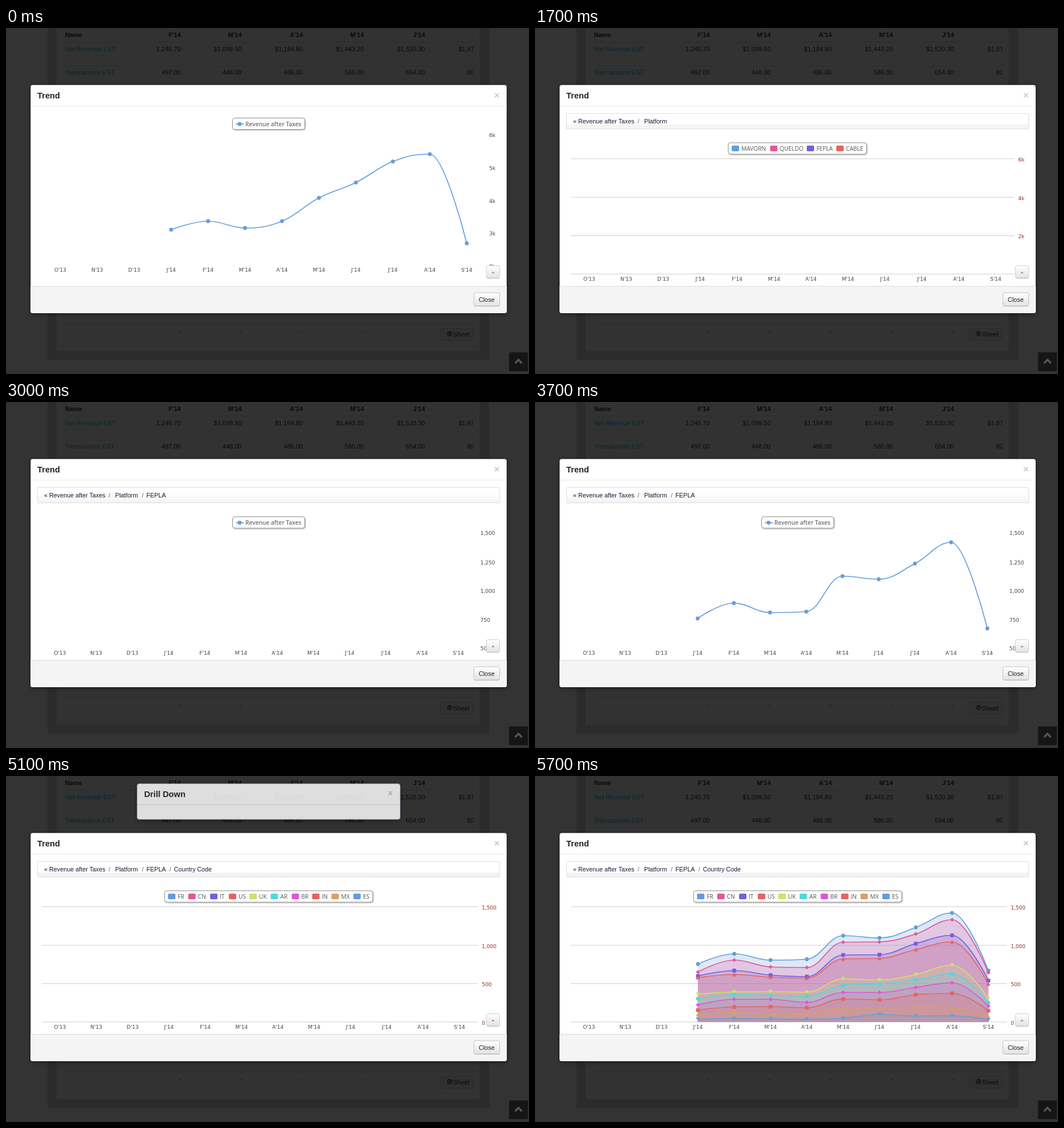
Animation, 920 px wide and 609 px high, one loop 7 s. Source, as an HTML page:

```html
<!DOCTYPE html>
<html lang="en">
<head>
<meta charset="utf-8">
<title>Trend</title>
<style>
html, body { margin: 0; width: 100%; height: 100%; overflow: hidden; background: #333; }
svg { display: block; width: 920px; height: 609px; }
text { font-family: "Liberation Sans", Arial, sans-serif; font-size: 11px; white-space: pre; }
.title { font-size: 14.7px; font-weight: bold; fill: #22252d; }
.x { font-size: 16px; font-weight: bold; fill: #c8c8c8; text-anchor: middle; }
.axis { font-family: "DejaVu Sans", sans-serif; font-size: 9px; fill: #444; }
.legend { font-family: "Open Sans", sans-serif; font-size: 10.2px; fill: #555; }
.tip { font-family: "Open Sans", sans-serif; font-size: 10.8px; fill: #333; }
.crumb { font-size: 10.8px; fill: #17173a; }
.pick { font-size: 9.5px; fill: #fff; stroke: #fff; stroke-width: .3px; text-anchor: middle; }
.back { fill: #090909; }
.link { fill: #0b222d; }
</style>
</head>
<body>
<svg viewBox="0 0 920 609" xmlns="http://www.w3.org/2000/svg">
  <defs>
    <linearGradient id="btn" x2="0" y2="1"><stop stop-color="#fff"/><stop offset="1" stop-color="#e2e2e2"/></linearGradient>
    <linearGradient id="pick" x2="0" y2="1"><stop stop-color="#0a70d4"/><stop offset="1" stop-color="#0564c2"/></linearGradient>
    <linearGradient id="soft" x2="0" y2="1"><stop offset=".3" stop-color="#fff"/><stop offset="1" stop-color="#f3f3f3"/></linearGradient>
    <linearGradient id="band" x2="0" y2="1"><stop offset=".71" stop-color="#fff"/><stop offset=".71" stop-color="#f4f4f4"/></linearGradient>
    <filter id="drop" x="-10%" y="-20%" width="120%" height="150%"><feDropShadow dx="0" dy="2" stdDeviation="3" flood-opacity=".4"/></filter>
    <filter id="near" x="-10%" y="-20%" width="120%" height="150%"><feDropShadow dx="1" dy="1" stdDeviation=".8" flood-opacity=".35"/></filter>
    <clipPath id="cells"><rect x="264" y="0" width="558" height="100"/></clipPath>
    <clipPath id="wipe"><rect id="wipeBox" x="63" y="140" height="310"/></clipPath>
  </defs>
  <g id="page"></g>
  <g id="trend"></g>
  <g id="chart"></g>
  <g id="drill"></g>
</svg>
<script>
const LOOP = 7000, TICK = 100;
const BLUE = '#649ddb', PINK = '#e6559a', VIOLET = '#7a5bdc', RED = '#e8635f';
const MONTHS = "O'13 N'13 D'13 J'14 F'14 M'14 A'14 M'14 J'14 J'14 A'14 S'14".split(' ');
const METRIC = 'Revenue after Taxes';
const $ = id => document.getElementById(id);

const text = (x, y, s, cls = '', more = '') => `<text x="${x}" y="${y}" class="${cls}" ${more}>${s}</text>`;
const rect = (x, y, w, h, fill, more = '') => `<rect x="${x}" y="${y}" width="${w}" height="${h}" fill="${fill}" ${more}/>`;
const hline = (x1, x2, y, color) => `<path d="M${x1} ${y}H${x2}" stroke="${color}"/>`;
const END = 'text-anchor="end"', MID = 'text-anchor="middle"';

/* Each chart: plot geometry, axis ticks, series heights from January on */
const charts = [
  {
    until: 1700, x0: 95.5, dx: 65, labelY: 429, legendY: 158, legend: [398, 128],
    yx: 850, ticks: [['6k', 192], ['5k', 250], ['4k', 308], ['3k', 365], ['2k', 422.5]],
    series: [{ name: METRIC, color: BLUE, ys: [355, 340, 352, 340, 299, 272, 235, 222, 379] }]
  },
  {
    until: 3000, start: 1650, x0: 95.5, dx: 65, labelY: 444.5, legendY: 201.5, legend: [339.5, 244],
    area: true, gridEnd: 843, yx: 850, ticks: [['6k', 235], ['4k', 303], ['2k', 370]], crumbs: 1,
    series: [
      { name: 'MAVORN', at: 346, color: BLUE, ys: [328.5, 319.5, 327, 320, 296, 280, 258, 250.5, 342.5] },
      { name: 'QUELDO', at: 413.5, color: PINK, ys: [355.5, 347, 352, 350, 328, 315.5, 299.5, 296, 362] },
      { name: 'FEPLA', at: 478, color: VIOLET, ys: [381, 374, 378, 377, 365, 357, 344, 339.5, 385] },
      { name: 'CABLE', at: 530, color: RED, ys: [406, 403.5, 405, 404.5, 403, 394, 385.5, 387, 407.5] }
    ]
  },
  {
    until: 5100, start: 3050, x0: 95, dx: 63.7, labelY: 444.5, legendY: 201.5, legend: [398, 128],
    yx: 834.5, ticks: [['1,500', 234], ['1,250', 285.5], ['1,000', 336], ['750', 387], ['500', 437]], crumbs: 2,
    series: [{ name: METRIC, color: BLUE, ys: [381, 354, 370.5, 369, 306.5, 312, 284.5, 247, 398.5] }]
  },
  {
    until: LOOP, start: 5050, x0: 95, dx: 63.87, labelY: 444.5, legendY: 201.5, legend: [278.5, 367],
    area: true, gridEnd: 830, yx: 837, ticks: [['1,500', 235], ['1,000', 303], ['500', 370], ['0', 438]], crumbs: 3,
    series: [
      { name: 'FR', at: 285, color: BLUE, ys: [331, 313, 324, 322.5, 281, 285, 266.5, 241, 342.5] },
      { name: 'CN', at: 320.5, color: PINK, ys: [345, 324, 336, 337, 292.5, 292, 278, 253, 346] },
      { name: 'IT', at: 359, color: VIOLET, ys: [352, 342.5, 350.5, 353, 315, 314.5, 295, 280.5, 360] },
      { name: 'US', at: 392, color: RED, ys: [355, 349.5, 354, 355.5, 322, 321, 305.5, 292, 366] },
      { name: 'UK', at: 428, color: '#d3e06a', ys: [384, 380, 379.5, 380.5, 357, 359, 349.5, 333, 392] },
      { name: 'AR', at: 465.5, color: '#4ed8e2', ys: [392, 385, 386, 387.5, 368.5, 366, 359, 348.5, 399] },
      { name: 'BR', at: 502.5, color: '#e254d6', ys: [403, 393, 393, 398.5, 381, 381, 372, 364, 405] },
      { name: 'IN', at: 538.5, color: RED, ys: [412, 406.5, 406, 408, 392.5, 394, 385, 382.5, 413] },
      { name: 'MX', at: 572.5, color: '#d9a066', ys: [420, 416.5, 420, 419, 408, 408, 406.5, 407.5, 424] },
      { name: 'ES', at: 611, color: BLUE, ys: [428, 427, 427.5, 428, 426.5, 419.5, 422.5, 422, 429] }
    ]
  }
];

/* Smooth line whose handles never overshoot a neighbouring point */
function spline(pts) {
  let d = `M${pts[0]}`, out = pts[0];
  for (let i = 1; i < pts.length; i++) {
    const [x, y] = pts[i], [px, py] = pts[i - 1];
    let inn = [x, y], next = [x, y];
    if (i < pts.length - 1) {
      const [nx, ny] = pts[i + 1];
      const lx = (1.5 * x + px) / 2.5, rx = (1.5 * x + nx) / 2.5;
      let ly = (1.5 * y + py) / 2.5, ry = (1.5 * y + ny) / 2.5;
      const fix = (ry - ly) * (rx - x) / (rx - lx) + y - ry;
      ly += fix; ry += fix;
      const clamp = (v, a, b) => Math.min(Math.max(v, Math.min(a, b)), Math.max(a, b));
      const l2 = clamp(ly, py, y);
      if (l2 !== ly) { ly = l2; ry = 2 * y - ly; }
      const r2 = clamp(ry, ny, y);
      if (r2 !== ry) { ry = r2; ly = 2 * y - ry; }
      inn = [lx, ly]; next = [rx, ry];
    }
    d += `C${out} ${inn} ${x},${y}`;
    out = next;
  }
  return d;
}

function marker(kind, x, y, color) {
  const paths = [
    'M-3.4 0a3.4 3.4 0 1 0 6.8 0a3.4 3.4 0 1 0 -6.8 0z',
    'M0 -3.6L3.6 0L0 3.6L-3.6 0z',
    'M-3.3 -3.3H3.3V3.3H-3.3z',
    'M0 -3.5L3.5 3.3H-3.5z',
    'M-3.5 -3.3H3.5L0 3.5z'
  ];
  return `<path d="${paths[kind % 5]}" transform="translate(${x} ${y})" fill="${color}"/>`;
}

function pageArt() {
  let s = rect(0, 0, 920, 609, '#333') + rect(73, 0, 777, 584, '#2b2b2b') + rect(89, 0, 744, 569, '#323232');
  for (const y of [24.5, 66.5, 505.5, 520.5]) s += hline(104, 822, y, '#2b2b2b');
  s += text(104, 16, 'Name', 'back', 'font-weight="bold"');
  s += text(104, 41, 'Net Revenue EST', 'link') + text(104, 82, 'Transactions EST', 'link');
  const ends = [307.5, 414.5, 522, 629.5, 737];
  const row = (cells, y, more = '') => cells.split(' ').map((c, i) => text(ends[i], y, c, 'back', END + more)).join('');
  s += row("F'14 M'14 A'14 M'14 J'14", 16, ' font-weight="bold"');
  s += '<g clip-path="url(#cells)">' + row('$1,245.70 $1,099.50 $1,184.80 $1,443.20 $1,520.30', 41)
    + row('497.00 448.00 486.00 586.00 654.00', 82)
    + text(796, 41, '$1,870.10', 'back') + text(811, 82, '802.00', 'back') + '</g>';
  s += row('- - - - -', 537);
  s += rect(764.5, 528.5, 57, 21, '#303030', 'rx="3" stroke="#282828"') + text(786.5, 543, 'Sheet', 'back');
  s += '<circle cx="780.5" cy="538" r="3.7" fill="none" stroke="#090909" stroke-width="1.3"/><path d="M778.3 537.5h4.4l-2.2 2.6zM779.8 535.5h1.4v2.5h-1.4z" fill="#090909"/>';
  s += rect(885, 571, 33, 33, '#151515') + '<path d="M895.5 590l6 -6l6 6" fill="none" stroke="#555" stroke-width="3.4"/>';
  return s;
}

function trendArt() {
  return rect(43, 100, 838, 402, '#fff', 'rx="4" stroke="#000" stroke-opacity=".5" filter="url(#drop)"')
    + text(55, 124, 'Trend', 'title') + text(863.5, 123.5, '×', 'x') + hline(43, 881, 137.5, '#eaeaea')
    + '<path d="M43 454H881V498a4 4 0 0 1 -4 4H47a4 4 0 0 1 -4 -4z" fill="#f4f4f4"/>' + hline(43, 881, 454.5, '#dcdcdc')
    + rect(823, 466, 45.5, 23.5, 'url(#btn)', 'rx="3" stroke="#c4c4c4"') + hline(825, 867, 489.5, '#aaa')
    + text(845.5, 481.5, 'Close', '', MID + ' fill="#222"');
}

function crumbArt(n) {
  if (!n) return '';
  const parts = [[67, '«'], [76, METRIC], [180.5, '/'], [192, 'Platform'], [239, '/'], [247, 'FEPLA'], [287.5, '/'], [295.5, 'Country Code']];
  return rect(55.5, 150.5, 813, 27, n === 2 ? 'url(#soft)' : 'url(#band)', 'rx="1.5" stroke="#dedede"')
    + parts.slice(0, 2 + 2 * n).map(([x, s]) => text(x, 168, s, 'crumb', s === '/' ? 'style="fill:#666"' : '')).join('');
}

function legendArt(c) {
  const [x, w] = c.legend, y = c.legendY;
  let s = rect(x + .5, y + .5, w - 1, 20, '#fff', 'rx="4" stroke="#909090" filter="url(#near)"');
  if (!c.area) {
    return s + `<path d="M404.5 ${y + 11}h14" stroke="${BLUE}" stroke-width="1.7"/>` + marker(0, 411, y + 11, BLUE)
      + text(421, y + 14.7, METRIC, 'legend', 'font-weight="600" style="fill:#707070"');
  }
  for (const e of c.series) s += rect(e.at, y + 5.5, 13, 10, e.color, 'rx="2"') + text(e.at + 17, y + 14.5, e.name, 'legend');
  return s;
}

function chartArt(c, done) {
  let s = crumbArt(c.crumbs);
  if (c.area) for (const y of [230, 298, 365.5, 433]) s += hline(63, c.gridEnd, y, '#cdcdcd');
  MONTHS.forEach((m, i) => s += text(c.x0 + i * c.dx, c.labelY, m, 'axis', MID));
  for (const [label, y] of c.ticks) s += text(c.yx, y, label, 'axis', c.area ? 'style="fill:#8a2f1f"' : '');
  let lines = '', fills = '', dots = '';
  c.series.forEach((e, k) => {
    const pts = e.ys.map((y, i) => [c.x0 + (i + 3) * c.dx, y]);
    const d = spline(pts);
    if (c.area) fills += `<path d="${d}V433H${pts[0][0]}z" fill="${e.color}" fill-opacity=".22"/>`;
    lines += `<path d="${d}" fill="none" stroke="${e.color}" stroke-width="1.7"/>`;
    if (done) dots += pts.map(p => marker(k, ...p, e.color)).join('');
  });
  s += `<g ${done ? '' : 'clip-path="url(#wipe)"'}>${fills}${lines}</g>${dots}`;
  s += legendArt(c);
  return s;
}

function tipArt(x, y, name, value, color, w = 119) {
  const l = x - 8 - w, t = y - 26;
  return rect(l, t, w, 39.5, '#fff', `fill-opacity=".87" rx="2" stroke="${color}" stroke-width="1.2" filter="url(#near)"`)
    + text(l + 7, t + 17.5, name, 'tip', 'font-weight="600"')
    + text(l + 7, t + 30.5, `<tspan font-weight="600">M'14</tspan> : ${value}`, 'tip');
}

function tooltip(t) {
  if (t >= 500 && t < 1700) return tipArt(420.5, 352, METRIC, '$3,172.60', BLUE);
  if (t >= 2500 && t < 3000) {
    const left = Math.max(0, 1 - (t - 2500) / 300);
    return tipArt(420.5 + 65 * left * left, 378, 'FEPLA', '$806.14', VIOLET, 88);
  }
  if (t >= 4000 && t < 5100) return tipArt(413.5, 370.5, METRIC, '$806.14', BLUE);
  return '';
}

const foldArt = rect(845, 418.5, 23.5, 22, 'url(#btn)', 'rx="3" stroke="#ccc"') + hline(847, 867, 440.5, '#b5b5b5')
  + '<path d="M854 431.5l2.8 -2.8l2.8 2.8z" fill="#888"/>';

const options = [['Platform', 52], ['Region', 45], ['Product Type Identifier', 109], ['Rights Holder', 71.5],
  ['Country Code', 73.5], ['Asset/Content Flavor', 102], ['Titles', 38]];

function drillArt(y, alpha, list, hover) {
  const h = list ? 116 : 63;
  let s = rect(230.5, .5, 463, h, '#fff', 'rx="4" stroke="#8d8da6" filter="url(#drop)"')
    + text(243, 24, 'Drill Down', 'title') + text(676, 23.5, '×', 'x')
    + hline(231, 693, 37.5, list ? '#f3f3f3' : '#d8d8d8');
  let x = 243, top = 50;
  for (const [label, w] of list || []) {
    if (x + w > 681) { x = 243; top += 26.5; }
    s += rect(x, top, w, 23, label === hover ? '#1339b0' : 'url(#pick)', 'rx="2"') + text(x + w / 2, top + 14.5, label, 'pick');
    x += w + 4.4;
  }
  return `<g transform="translate(0 ${y})" opacity="${alpha}">${s}</g>`;
}

/* The dialog drops in from above and leaves the same way */
function drill(t) {
  const unit = start => Math.min(1, Math.max(0, (t - start) / 175));
  const drop = (start, list, hover) => {
    const u = unit(start);
    return drillArt(100 - 252 * (1 - u) ** 1.8, u, list, hover);
  };
  if (t >= 1000 && t < 1700) return drop(923, options, t >= 1400 ? 'Platform' : '');
  if (t >= 4000 && t < 5100) {
    const hover = t < 4300 ? '' : t < 4400 ? 'Region' : t < 4600 ? options[2][0] : t < 4700 ? 'Rights Holder' : 'Country Code';
    return drop(3900, options.slice(1), hover);
  }
  if (t >= 5100 && t < 5300) {
    const u = unit(5072);
    return drillArt(100 - 252 * (1 - (1 - u) ** 2.43), 1 - u);
  }
  return '';
}

function render(t) {
  const c = charts.find(e => t < e.until);
  const u = c.start ? Math.min(1, Math.max(0, (t - c.start) / 650)) : 1;
  $('wipeBox').setAttribute('width', 780 * (.5 - Math.cos(Math.PI * u) / 2));
  $('chart').innerHTML = chartArt(c, u === 1) + tooltip(t) + foldArt;
  $('drill').innerHTML = drill(t);
}

$('page').innerHTML = pageArt();
$('trend').innerHTML = trendArt();
const begin = performance.now();
let last = -1;
function loop() {
  const t = Math.floor((performance.now() - begin) % LOOP / TICK) * TICK;
  if (t !== last) render(last = t);
  requestAnimationFrame(loop);
}
loop();
</script>
</body>
</html>
```
